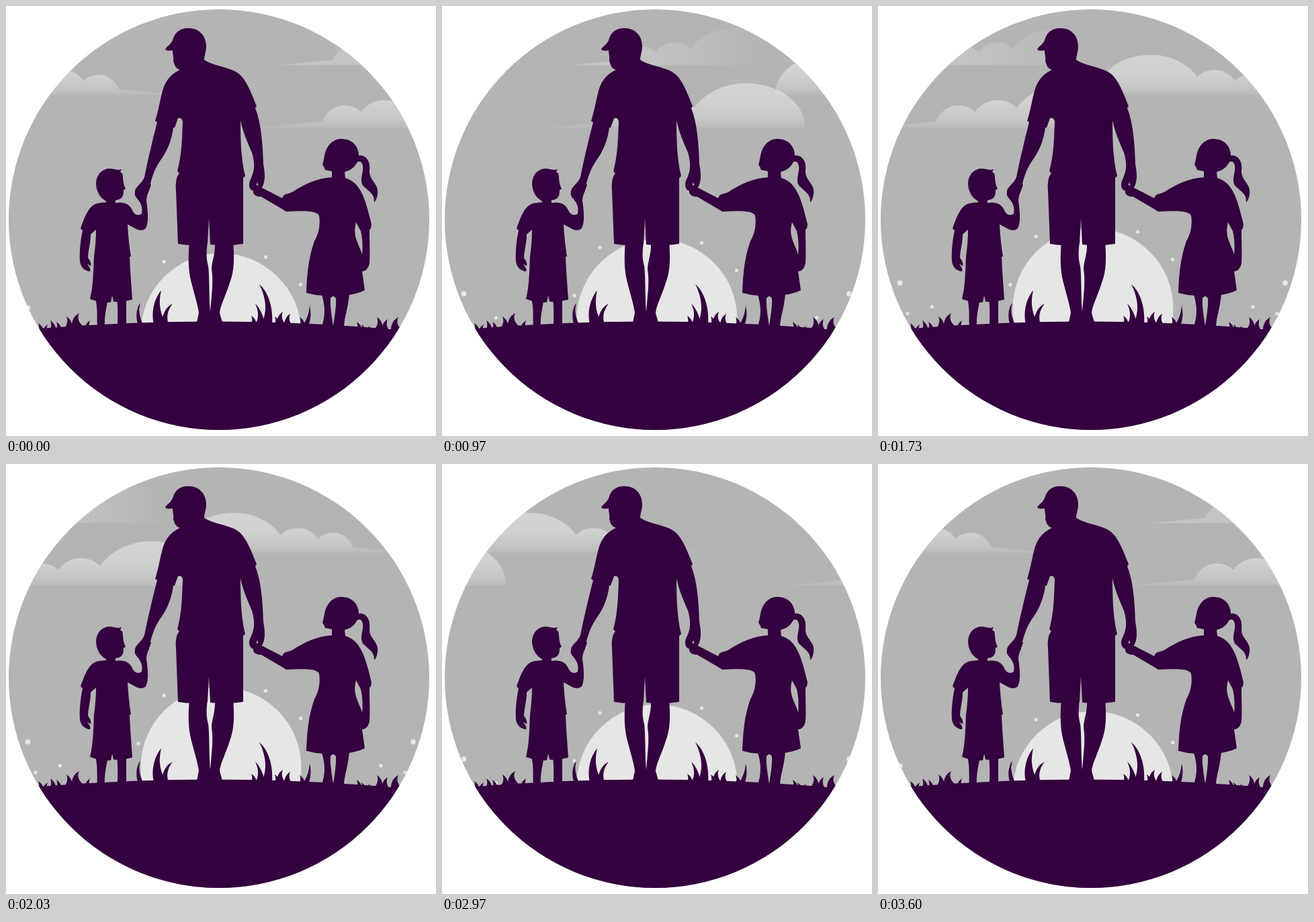
An HTML page without scripts that plays this animation: 640 by 640 pixels, repeating every 3.63 s.

```html
<!DOCTYPE html>
<html lang="en">
<head>
<meta charset="utf-8">
<title>Evening walk</title>
<style>
  html, body { margin: 0; width: 100%; height: 100%; overflow: hidden; background: #fff; }
  svg { display: block; width: 100vw; height: 100vh; }
  .ink { fill: #34003f; }
  .glow { fill: #e6e6e6; animation: rise 3.63s infinite; }
  .drift { animation: drift 3.63s linear infinite; }

  /* Both loops rest on their start pose for the last 30 ms. */
  @keyframes rise {
    0%, 99.17%, 100% { transform: translateY(0); animation-timing-function: cubic-bezier(.364, 0, .636, 1); }
    49.59% { transform: translateY(-37.5px); animation-timing-function: cubic-bezier(.364, 0, .636, 1); }
  }
  @keyframes drift {
    0% { transform: translateX(0); }
    99.17%, 100% { transform: translateX(-800px); }
  }
</style>
</head>
<body>
<svg viewBox="0 0 640 640">
  <defs>
    <clipPath id="disc"><circle cx="317" cy="318" r="313"/></clipPath>
    <linearGradient id="soft" x2="0" y2="1">
      <stop offset="0" stop-color="#fff" stop-opacity=".42"/>
      <stop offset=".5" stop-color="#fff" stop-opacity=".38"/>
      <stop offset=".85" stop-color="#fff" stop-opacity=".21"/>
      <stop offset="1" stop-color="#fff" stop-opacity=".1"/>
    </linearGradient>
    <linearGradient id="fade">
      <stop offset="0" stop-color="#fff" stop-opacity=".27"/>
      <stop offset=".4" stop-color="#fff" stop-opacity=".2"/>
      <stop offset=".65" stop-color="#fff" stop-opacity=".12"/>
      <stop offset=".95" stop-color="#fff" stop-opacity="0"/>
    </linearGradient>
    <path id="cloud" d="M-95,0 L0,-9 C6,-25 20,-33 32,-33 C43,-33 53,-29 58,-23 C66,-35 79,-41 92,-41 C103,-41 113,-37 120,-29 C135,-51 165,-66 195,-66 C245,-66 285,-39 285,0 Z"/>
    <g id="clouds">
      <use href="#cloud" transform="translate(486 88) scale(.83)" fill="url(#fade)"/>
      <use href="#cloud" transform="translate(471 181)" fill="url(#soft)"/>
      <use href="#cloud" transform="translate(168 132) scale(-.9 .9)" fill="url(#soft)"/>
    </g>
    <!-- Blade tip at the origin, leaning left -->
    <path id="blade" d="M0,0 C6,4 10,11 9,22 H-7 C1,15 3,7 0,0 Z"/>
    <g id="tuft">
      <use href="#blade" x="48" y="472"/>
      <use href="#blade" x="66" y="468"/>
      <use href="#blade" x="75" y="470"/>
      <use href="#blade" x="90" y="462"/>
      <use href="#blade" transform="translate(62 474) scale(-1 1)"/>
      <use href="#blade" transform="translate(109 457) scale(-1.2 1)"/>
      <use href="#blade" transform="translate(125 468) scale(-1 1)"/>
    </g>
  </defs>

  <g clip-path="url(#disc)">
    <rect width="640" height="640" fill="#b4b4b4"/>
    <g class="drift">
      <use href="#clouds"/>
      <use href="#clouds" x="800"/>
    </g>

    <g class="glow">
      <circle cx="320" cy="487.5" r="119.5"/>
      <circle cx="235" cy="380.5" r="2.6"/>
      <circle cx="386.500" cy="373.500" r="2.6"/>
      <circle cx="438.500" cy="414.500" r="2.6"/>
      <circle cx="197" cy="452" r="2.6"/>
      <circle cx="32.500" cy="449.500" r="3.9"/>
      <circle cx="606" cy="449.500" r="3.9"/>
      <circle cx="80.500" cy="485" r="2.6"/>
      <circle cx="44" cy="495" r="2.6"/>
      <circle cx="558" cy="485" r="2.6"/>
      <circle cx="594" cy="495" r="2.6"/>
    </g>

    <g class="ink">
      <path d="M0,484 L40,481 Q317,457 594,483 L640,486 V640 H0 Z"/>

      <!-- Grass -->
      <use href="#tuft"/>
      <use href="#blade" x="522" y="470"/>
      <use href="#blade" x="552" y="463"/>
      <use href="#blade" x="529" y="474"/>
      <use href="#blade" transform="translate(542 476) scale(-1 1)"/>
      <use href="#blade" transform="translate(568 466) scale(-1 1)"/>
      <use href="#blade" transform="translate(584 463) scale(-1.200 1)"/>
      <use href="#blade" x="365" y="461"/>
      <use href="#blade" x="400" y="462"/>
      <use href="#blade" transform="translate(412 455) scale(-1 1)"/>
      <use href="#blade" transform="translate(423 458) scale(-1 1)"/>
      <use href="#blade" x="437" y="463"/>
      <path d="M200,442 C193,450 193,465 197,476 H205 C198,462 197,452 200,442 Z"/>
      <path d="M231,423 C220,437 216,455 220,474 H240 C230,461 226,444 231,423 Z"/>
      <path d="M248,443 C238,448 232,459 232,474 H242 C238,462 241,452 248,443 Z"/>
      <path d="M377,414 C391,426 398,450 396,474 H380 C389,457 388,436 377,414 Z"/>
      <path d="M371,443 C378,450 384,462 385,474 H371 C377,464 376,454 371,443 Z"/>
      <path d="M452,446 C455,458 453,468 450,477 H441 C448,466 451,458 452,446 Z"/>

      <!-- Father -->
      <path d="M237,64 C242,58 247,56 249,48 C252,38 261,32.500 272,33 C288,33 298,45 298,60 C298,68 295,74 295,80
               C305,87 320,89 336,95 C353,101 360,116 373,149 L371,152
               C380,175 382,205 383,235 C386,250 386,262 381,270 L377,272 L374,262 L371,272 L367,275 C361,272 361,264 364,258
               C370,246 371,235 366,218 C358,200 352,185 349,170 C349,200 350,230 356,253 L353,256 V354
               Q328,358 304,355 L302,316 L300,354 Q277,358 256,354 L253,275 C252,262 254,253 258,249 L255,246
               C262,220 262,195 263,172 C262,167 260,166 256,167 L251,181 L249,181
               C246,203 239,217 229,231 C221,243 218,253 215,264 C214,276 209,284 203,290 C195,288 190,279 193,272
               C199,264 206,260 207,250 C211,230 218,200 225,173 L222,171 C228,152 230,135 234,123
               C239,108 247,101 259,95 C255,94 252,91 251,88 L249,82 C250,76 248,72 248,66 C243,67 238,67 237,64 Z"/>
      <path d="M273,350 C271,372 271,394 276,412 C281,431 286,447 287,457 L284,471 H322 L318,457
               C319,445 328,429 333,412 C340,394 340,375 338,350 H311 C312,370 306,380 306,392
               C309,410 306,430 304,455 C302,430 303,402 301,387 C298,376 298,368 300,350 Z"/>

      <!-- Boy -->
      <path d="M134,263 C135,249 145,241 156,242 L167,244 L172,243 L170,247 L173,249 C175,256 173,262 178,272 L175,274
               C175,283 173,288 163,289 V293 C176,291 183,295 187,302 C190,309 195,314 202,309
               C204,298 200,292 193,284 C189,277 194,270 206,259 L216,266 C213,275 209,282 209,290
               C211,305 213,321 208,331 C203,335 198,334 194,332 L181,325 C182,345 184,360 186,373 H184
               C185,400 187,420 188,437 Q174,441 160,440 L158,431 L156,441 Q140,442 125,436
               C130,417 130,393 131,373 C133,358 134,345 134,333 L128,338 L126,340 C126,354 122,364 122,375
               C126,380 127,384 126,387 L121,384 C123,388 127,391 125,395 C116,394 111,388 110,380
               C109,365 111,348 114,334 L111,331 C117,315 123,294 140,293 L150,292 L147,289 C139,285 134,274 134,263 Z"/>
      <path d="M133,435 C137,452 135,465 136,479 H147 C146,465 149,450 152,436 Z
               M165,436 C167,452 166,465 166,479 H179 V435 Z"/>

      <!-- Girl -->
      <path fill-rule="evenodd" d="M480,208 C485,201 493,197 501,198 C515,198 525,209 525,222 C525,235 516,244 504,247 L505,256
               C526,262 534,282 544,325 L543,331 L541,333 C541,350 542,370 541,383 C539,392 534,395 530,395 L534,423
               C512,434 472,434 447,427 C448,400 450,375 459,350 C466,338 468,325 466,312 C463,304 440,305 417,306 L409,301
               L380,284 C372,284 367,280 368,275 C369,268 373,264 378,269 L411,286 C413,279 420,280 426,277
               C446,264 465,256 485,255 V246 C478,244 474,246 474,241 L471,236 C474,229 473,217 480,208 Z
               M521,322 L528,335 C531,348 531,360 530,370 C526,354 515,344 521,322 Z"/>
      <path d="M523,223 C536,220 543,232 541,245 C540,260 556,265 553,280 C552,287 550,290 548,292 C549,280 540,276 532,268
               C525,260 533,246 531,238 C530,232 527,230 522,233 Z"/>
      <path d="M469,426 C476,448 475,462 470,477 H487 C485,462 482,446 483,435 Q487,429 491,435
               C492,446 489,462 487,477 H503 C504,460 510,448 511,426 Z"/>
    </g>
  </g>
</svg>
</body>
</html>
```
